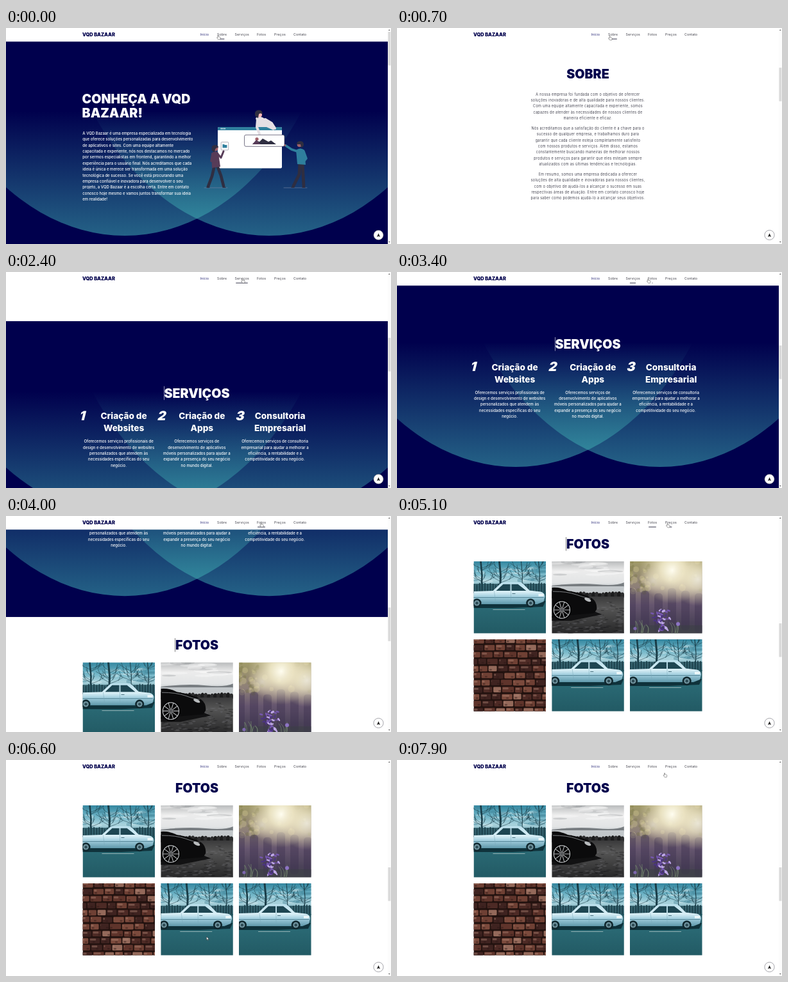
An HTML page for the animation above (8 s loop, 600x338 px).

```html
<!DOCTYPE html>
<html lang="pt-BR">
<head>
<meta charset="utf-8">
<title>VQD Bazaar</title>
<style>
html, body { margin: 0; width: 100%; height: 100%; overflow: hidden; background: #fff; }
svg { display: block; }
text { font-family: Inter, "Open Sans", sans-serif; white-space: pre; }
.black { font-weight: 900; }
.h { font-size: 19.6px; font-weight: 900; }
.mid { text-anchor: middle; }
.body { font-size: 6px; font-weight: 500; fill: #fff; }
.about { font-size: 5.5px; font-weight: 300; letter-spacing: .32px; fill: #0c0c1c; }
.nav { font-size: 5.2px; font-weight: 400; letter-spacing: .12px; fill: #3c3c46; }
</style>
</head>
<body>
<svg id="stage" width="600" height="338" viewBox="0 0 600 338">
  <defs>
    <linearGradient id="glow" gradientUnits="userSpaceOnUse" x1="0" y1="110" x2="0" y2="305">
      <stop offset="0" stop-color="#48c4c0" stop-opacity="0"/>
      <stop offset="1" stop-color="#48c4c0" stop-opacity=".5"/>
    </linearGradient>
    <linearGradient id="sky" x2="0" y2="1">
      <stop offset="0" stop-color="#3487a0"/><stop offset=".35" stop-color="#6fb4c6"/>
      <stop offset=".6" stop-color="#a9d3dd"/><stop offset="1" stop-color="#4f8794"/>
    </linearGradient>
    <linearGradient id="road" x2="0" y2="1">
      <stop offset="0" stop-color="#1f515c"/><stop offset=".35" stop-color="#2a6974"/><stop offset="1" stop-color="#225a64"/>
    </linearGradient>
    <linearGradient id="paint" x2="0" y2="1">
      <stop offset="0" stop-color="#b9dfec"/><stop offset=".45" stop-color="#d9eff6"/>
      <stop offset=".65" stop-color="#a3cfdf"/><stop offset="1" stop-color="#5f98aa"/>
    </linearGradient>
    <linearGradient id="cloud" x2="0" y2="1">
      <stop offset="0" stop-color="#b9bbbc"/><stop offset=".35" stop-color="#ececec"/>
      <stop offset=".8" stop-color="#e2e4e5"/><stop offset="1" stop-color="#b9bfc2"/>
    </linearGradient>
    <linearGradient id="asphalt" x2="0" y2="1">
      <stop offset="0" stop-color="#3a3a3b"/><stop offset=".3" stop-color="#555"/><stop offset="1" stop-color="#262627"/>
    </linearGradient>
    <linearGradient id="dusk" x2="0" y2="1">
      <stop offset="0" stop-color="#a09a68"/><stop offset=".35" stop-color="#8e8078"/>
      <stop offset=".6" stop-color="#66566f"/><stop offset=".85" stop-color="#4b4258"/><stop offset="1" stop-color="#45454c"/>
    </linearGradient>
    <radialGradient id="sun">
      <stop offset="0" stop-color="#fffdf0"/><stop offset=".35" stop-color="#f6efcf" stop-opacity=".85"/>
      <stop offset="1" stop-color="#e6d8b8" stop-opacity="0"/>
    </radialGradient>
  </defs>
  <rect width="600" height="338" fill="#fff"/>
  <g id="page"></g>
  <g id="head"></g>
  <g id="chrome">
    <circle cx="580.5" cy="324" r="7.6" fill="#fff" stroke="#6a6a74" stroke-width=".6"/>
    <path d="M580.5 321.2L583 327L580.5 325.8L578 327Z" fill="#111"/>
    <rect x="595" width="5" height="338" fill="#fcfcfc"/>
    <path d="M596 4L597.3 2.2L598.6 4ZM596 334L597.3 335.8L598.6 334Z" fill="#555"/>
    <rect id="thumb" x="595.4" y="6" width="4" height="52.5" fill="#dadada"/>
  </g>
  <g id="pointer">
    <path id="arrow" d="M0 0V5.2L1.3 4.1L2.1 5.9L2.9 5.5L2.1 3.8H3.8Z" fill="#fff" stroke="#222" stroke-width=".5"/>
    <path id="hand" d="M-.5 .6Q0 -.3 .6 .6V2.7L3.1 3.2Q3.9 3.5 3.8 4.4L3.2 7H.2L-1.9 4.2Q-1.8 3.3 -1 3.7L-.5 4.1Z" fill="#fff" stroke="#333" stroke-width=".45"/>
  </g>
</svg>
<script>
const $ = id => document.getElementById(id);
const NAVY = '#00004d', LOOP = 8000, LINE = 9.37;

const rect = (x, y, w, h, fill, more = '') =>
  `<rect x="${x}" y="${y}" width="${w}" height="${h}" fill="${fill}" ${more}/>`;
const dot = (x, y, r, fill, more = '') => `<circle cx="${x}" cy="${y}" r="${r}" fill="${fill}" ${more}/>`;
const oval = (x, y, rx, ry, fill, more = '') =>
  `<ellipse cx="${x}" cy="${y}" rx="${rx}" ry="${ry}" fill="${fill}" ${more}/>`;
const shape = (d, fill) => `<path d="${d}" fill="${fill}"/>`;
const stroke = (d, color, w) =>
  `<path d="${d}" fill="none" stroke="${color}" stroke-width="${w}" stroke-linecap="round" stroke-linejoin="round"/>`;
const text = (x, y, cls, s, more = '') => `<text x="${x}" y="${y}" class="${cls}" ${more}>${s}</text>`;
const lines = (x, y, cls, s) =>
  s.split('|').map((row, i) => text(x, y + i * LINE, cls, row)).join('');
const box = (x, y, w, h, inner) => `<svg x="${x}" y="${y}" width="${w}" height="${h}">${inner}</svg>`;
const repeat = (n, draw) => Array.from({ length: n }, (_, i) => draw(i)).join('');

function seeded(seed) {
  return () => (seed = (seed * 16807) % 2147483647) / 2147483647;
}

function blueSection(top) {
  const arc = cx => oval(cx, -175, 343, 480, 'url(#glow)');
  return box(0, top, 595, 338, rect(0, 0, 595, 338, NAVY) + arc(185) + arc(410));
}

function illustration() {
  const dark = '#2f2e41', skin = '#a0616a', pale = '#e4dfe4', teal = '#2f7f9d', plum = '#573c58';
  const ground = x => stroke(`M${x} 250H${x + 36}`, '#6f7f9f', .7);
  return rect(330, 155, 100, 64.5, '#fff', 'rx="2"')
    + shape('M330 160V157Q330 155 332 155H428Q430 155 430 157V160Z', teal)
    + [335.5, 338.2, 340.9].map(x => dot(x, 157.5, .9, '#fff')).join('')
    // seated figure
    + shape('M389 141Q393 137 400 140L412 147L420 155L417 160L406 155H393Z', pale)
    + stroke('M392 143L391 155L395 166', pale, 4)
    + stroke('M404 143L414 149L419 157', pale, 4)
    + dot(395, 135.5, 4, '#ffb8b8')
    + shape('M388 133Q389 128 395 128.5Q400 129 399.5 135Q396 132 394 135L393 141Q387 139 388 133Z', dark)
    // floating card
    + rect(371.5, 167.3, 62.5, 18, '#fff', 'rx="2.5" stroke="#3f3d56" stroke-width=".7"')
    + dot(391, 173.8, 2.6, skin)
    + shape('M384 182L390 176L395 178L400 173L409 178L413 176L421 182Z', dark)
    + shape('M384 182L390 175L397 182Z', plum)
    // left figure
    + ground(309)
    + stroke('M325 215L321 232L315 248', dark, 4.6) + stroke('M329 215L335 231L339 247', dark, 4.6)
    + stroke('M313 249.3H317M338 249.3H342', dark, 1.4)
    + shape('M320 196Q326 191 331 195L334 217L321 219Z', plum)
    + stroke('M322 197L320 208L327 209', plum, 3.6) + stroke('M330 197L335 203L339 193', plum, 3)
    + dot(326.5, 188.5, 4, skin)
    + shape('M320.5 189Q320 183 326 183Q331 183 331 187Q327 187 326 190L325 194Q321 194 320.5 189Z', dark)
    + rect(335.2, 178.5, 11.5, 12.5, '#fff', 'rx="1.2" stroke="#3f3d56" stroke-width=".4"')
    + shape('M337.5 182H340L341 183H344.4V187.6H337.5Z', teal)
    // right figure
    + ground(433)
    + stroke('M458 211L457 229L448 247', dark, 4.8) + stroke('M462 211L463 230L464 247', dark, 4.8)
    + stroke('M445 249.3H449M462 249.3H466', dark, 1.4)
    + shape('M452 191Q459 186 465 191L467 214L454 213Z', teal)
    + stroke('M454 193L445 190L436 184', teal, 3.6) + stroke('M464 193L468 204L462 211', teal, 3.6)
    + dot(434.8, 183.4, 1.5, skin) + dot(457.5, 182.5, 3.8, skin)
    + shape('M453 182Q453 177 459 177Q464 177 464 183Q463 187 460 187L459 182Z', dark);
}

function whiteCar() {
  const r = seeded(7), ink = '#1a3d48';
  const clouds = repeat(34, i =>
    oval(r() * 113, 4 + r() * 28, 4 + r() * 9, 1 + r() * 1.8, i % 2 ? '#d6ebf0' : '#3f8296', 'opacity=".45"'));
  const tree = (x, w) => stroke(`M${x} 48L${x + 1} 22L${x - 1} 0`, ink, w) + repeat(10, i => {
    const y = 8 + r() * 26, d = (i % 2 ? 1 : -1) * (6 + r() * 16);
    return stroke(`M${x} ${y}Q${x + d / 2} ${y - 3} ${x + d} ${y - 10}m${-d / 3} 5l${d / 5} -9`, ink, .55);
  });
  const wheel = x => dot(x, 65.2, 7, '#10272e') + dot(x, 65.2, 4.4, '#6f929d') + dot(x, 65.2, 2.2, '#2c4a54');
  return rect(0, 0, 113, 50, 'url(#sky)') + clouds
    + tree(12, 2.6) + tree(41, 3) + tree(75, 1) + tree(102, 1.2)
    + rect(0, 35, 113, 14, '#2a5561', 'opacity=".85"')
    + repeat(28, i => rect(i * 4.2, 33 + r() * 4, 1.6, 14, ink))
    + rect(0, 48, 113, 65, 'url(#road)') + shape('M0 62H112L108 71L60 73H0Z', '#0f323b')
    + shape('M0 47L30 46L42 34.5Q45 32.3 51 32.3H69Q74 32.3 78 36L87 45.5L104 47.5Q111 49 111 55L109 63L99 67H0Z', 'url(#paint)')
    + shape('M35 46L46 35.7H57V46ZM59 46V35.7H69L82 46Z', '#1e4652')
    + stroke('M0 56.5H109', '#4d7f90', .9) + stroke('M58 36V63M32 47L34 62', '#7ba9b8', .5)
    + rect(60, 50, 5, .8, '#2c5664') + rect(101, 51, 8, 3.6, '#eef8fa')
    + wheel(5) + wheel(88.7) + rect(30, 75, 50, .9, '#9dbabb');
}

function blackCar() {
  const r = seeded(23), cx = 15.7, cy = 76;
  const clouds = repeat(20, i =>
    oval(r() * 113, r() * 26, 8 + r() * 14, 1 + r() * 2.5, i % 3 ? '#fafafa' : '#9da0a2', 'opacity=".4"'));
  const wall = repeat(24, i => oval(i * 5, 52 + r() * 2, 3.2, 4 + r() * 2, i % 2 ? '#1c1c1d' : '#2d2d2e'));
  const cobbles = repeat(150, i =>
    oval(r() * 113, 64 + r() * 49, 2 + r() * 3, .8, i % 2 ? '#77777a' : '#161617', 'opacity=".4"'));
  const spokes = repeat(10, i => {
    const a = i * Math.PI / 5;
    return stroke(`M${cx} ${cy}L${cx + 12 * Math.cos(a)} ${cy + 12.5 * Math.sin(a)}`, '#b5b7b9', 1.1);
  });
  return rect(0, 0, 113, 42, 'url(#cloud)') + clouds
    + shape('M0 38Q40 33 70 36T113 33V40H0Z', '#777c80') + rect(0, 39, 113, 12, '#c2c7ca')
    + wall + rect(0, 55, 113, 58, 'url(#asphalt)') + cobbles
    + shape('M0 86L66 78L78 83L30 93H0Z', '#121213')
    + shape('M0 41Q14 40 25 46Q50 50 63 58Q71 64 70 75L66 81L32 84L0 88Z', '#0b0b0c')
    + stroke('M2 47Q24 47 38 52T60 58', '#8a8d90', .9)
    + oval(56, 60, 5.5, 2.4, '#b9bcbe', 'transform="rotate(24 56 60)"')
    + oval(cx, cy, 15, 16, '#050506')
    + oval(cx, cy, 12.6, 13.2, 'none', 'stroke="#b9bcbe" stroke-width="1.2"')
    + spokes + dot(cx, cy, 2.4, '#55575a');
}

function flowers() {
  const r = seeded(41);
  const leaves = repeat(46, i =>
    dot(r() * (i % 3 ? 30 : 112), r() * 50, 1.5 + r() * 4, i % 2 ? '#6f7038' : '#e0d69a', 'opacity=".28"'));
  const fence = repeat(6, i =>
    rect(-4 + i * 21, 42 + (i % 3) * 4, 13, 62, '#3d3050', 'rx="5" opacity=".42"'));
  const stems = repeat(14, () => {
    const x = 6 + r() * 70;
    return stroke(`M${x} 113Q${x + 3} 102 ${x + 5 - r() * 10} ${92 + r() * 10}`, '#70806c', .8);
  });
  const petals = repeat(44, i => {
    const x = 32 + (r() + r()) * 16, y = 76 + r() * 32;
    return oval(x, y, 2.9, 1.3, ['#7657b0', '#bfa9e6', '#4b3480'][i % 3], `transform="rotate(${r() * 180} ${x} ${y})"`);
  });
  return rect(0, 0, 113, 113, 'url(#dusk)') + leaves + fence
    + dot(66, 14, 52, 'url(#sun)') + dot(106, 28, 42, 'url(#sun)', 'opacity=".75"') + dot(36, 30, 22, 'url(#sun)', 'opacity=".4"')
    + rect(0, 100, 113, 13, '#3b3e44', 'opacity=".5"') + stems + petals
    + dot(75, 98, 3, '#8d74c4') + dot(8, 105, 2.6, '#7c66ad');
}

function bricks() {
  const r = seeded(5), tones = ['#5f342b', '#6f4034', '#4d2a25', '#7b4a3c', '#3f2320', '#94695a'];
  let s = rect(0, 0, 113, 113, '#22120f');
  for (let row = 0; row < 11; row++)
    for (let x = -r() * 14; x < 113;) {
      const w = 11 + r() * 8, y = row * 11 - 3 + r();
      s += rect(x, y, w, 8.6, tones[Math.floor(r() * 6)], 'rx="1.4"')
        + rect(x + 1, y + 1, w * .7 * r(), 3, '#b58b79', 'opacity=".4" rx="1"')
        + rect(x + w * r() * .7, y + 5, 4, 2.4, '#2a1714', 'opacity=".45" rx="1"');
      x += w + 1.8;
    }
  return s;
}

const photos = [whiteCar, blackCar, flowers, bricks, whiteCar, whiteCar].map((draw, i) =>
  box(119.5 + (i % 3) * 121.75, 1105 + Math.floor(i / 3) * 122, 112.5, 112.5, draw())).join('');

const services = [
  ['Criação de', 'Websites', 'Oferecemos serviços profissionais de|design e desenvolvimento de websites|personalizados que atendem às|necessidades específicas do seu|negócio.'],
  ['Criação de', 'Apps', 'Oferecemos serviços de|desenvolvimento de aplicativos|móveis personalizados para ajudar a|expandir a presença do seu negócio|no mundo digital.'],
  ['Consultoria', 'Empresarial', 'Oferecemos serviços de consultoria|empresarial para ajudar a melhorar a|eficiência, a rentabilidade e a|competitividade do seu negócio.']
].map(([a, b, copy], i) => {
  const x = 175.6 + i * 121.75, title = 'font-size="13.6" font-weight="800" fill="#fff"';
  return `<g transform="translate(${x - 62} 851) skewX(-14)">${text(0, 0, 'black', i + 1, 'font-size="20" fill="#fff"')}</g>`
    + text(x + 8, 849.6, 'mid', a, title) + text(x + 8, 868.6, 'mid', b, title)
    + lines(x, 886.6, 'body mid', copy);
}).join('');

$('page').innerHTML = blueSection(20)
  + text(118.6, 117.8, 'h', 'CONHEÇA A VQD', 'fill="#fff"') + text(118.6, 140.2, 'h', 'BAZAAR!', 'fill="#fff"')
  + lines(119.3, 167, 'body', 'A VQD Bazaar é uma empresa especializada em tecnologia|que oferece soluções personalizadas para desenvolvimento|de aplicativos e sites. Com uma equipe altamente|capacitada e experiente, nós nos destacamos no mercado|por sermos especialistas em frontend, garantindo a melhor|experiência para o usuário final. Nós acreditamos que cada|ideia é única e merece ser transformada em uma solução|tecnológica de sucesso. Se você está procurando uma|empresa confiável e inovadora para desenvolver o seu|projeto, a VQD Bazaar é a escolha certa. Entre em contato|conosco hoje mesmo e vamos juntos transformar sua ideia|em realidade!')
  + illustration()
  + text(297.5, 437, 'h mid', 'SOBRE', `fill="${NAVY}"`)
  + lines(297.5, 463.7, 'about mid', 'A nossa empresa foi fundada com o objetivo de oferecer|soluções inovadoras e de alta qualidade para nossos clientes.|Com uma equipe altamente capacitada e experiente, somos|capazes de atender às necessidades de nossos clientes de|maneira eficiente e eficaz.')
  + lines(297.5, 516.8, 'about mid', 'Nós acreditamos que a satisfação do cliente é a chave para o|sucesso de qualquer empresa, e trabalhamos duro para|garantir que cada cliente esteja completamente satisfeito|com nossos produtos e serviços. Além disso, estamos|constantemente buscando maneiras de melhorar nossos|produtos e serviços para garantir que eles estejam sempre|atualizados com as últimas tendências e tecnologias.')
  + lines(297.5, 588.9, 'about mid', 'Em resumo, somos uma empresa dedicada a oferecer|soluções de alta qualidade e inovadoras para nossos clientes,|com o objetivo de ajudá-los a alcançar o sucesso em suas|respectivas áreas de atuação. Entre em contato conosco hoje|para saber como podemos ajudá-lo a alcançar seus objetivos.')
  + blueSection(696)
  + text(297.5, 816, 'h mid', 'SERVIÇOS', 'fill="#fff"') + services
  + text(297.5, 1085, 'h mid', 'FOTOS', `fill="${NAVY}"`) + photos
  + '<rect id="caret" width=".7" height="21.5"/>';

// label, x, width, hover start, hover end
const links = [
  ['Início', 302.5, 13.5], ['Sobre', 329, 15, -170, 1450], ['Serviços', 356.5, 22, 1600, 3250],
  ['Fotos', 391, 14, 3350, 5080], ['Preços', 418, 17.5, 5010, 5400], ['Contato', 448, 21]
];
$('head').innerHTML = rect(0, 0, 595, 21.3, '#fff')
  + text(119, 13, 'black', 'VQD BAZAAR', `font-size="7.4" fill="${NAVY}"`)
  + links.map(([s, x], i) => text(x, 12.2, 'nav', s, i ? '' : 'style="fill:#2a2a78"')).join('')
  + links.map((_, i) => `<rect id="bar${i}" y="16.7" height=".9" fill="#22223a"/>`).join('');

const clamp = v => Math.max(0, Math.min(1, v));
const ease = v => { v = clamp(v); return v * v * (3 - 2 * v); };

const SCROLLS = [[0, 358], [1917, 338], [3636, 338]];
const BLINKS = [[1100, 1600], [2100, 2650], [3100, 4100], [4600, 5150], [5650, 6150]];
const CARETS = [[262.6, 418, '#222'], [246.3, 798, '#fff'], [263, 1067, '#222']];
const PATH = [
  [0, 330.5, 11], [700, 331.5, 12], [1250, 331.5, 12], [1800, 368.5, 10.3], [3050, 368.5, 10.3],
  [3550, 397.5, 10.3], [4550, 397.5, 10.3], [5100, 421.5, 11], [5500, 424, 14], [6500, 312.5, 276.5],
  [6900, 312.5, 276.5], [7800, 417, 20], [8000, 417, 20]
];

function pointerAt(t) {
  const i = PATH.findIndex(p => p[0] > t), a = PATH[i - 1], b = PATH[i];
  const k = ease((t - a[0]) / (b[0] - a[0]));
  return [a[1] + (b[1] - a[1]) * k, a[2] + (b[2] - a[2]) * k];
}

function render(t) {
  const scroll = SCROLLS.reduce((y, [start, by]) => y + by * ease((t - start) / 700), 0);
  $('page').setAttribute('transform', `translate(0 ${-scroll})`);
  $('thumb').setAttribute('y', 6 + scroll * .1567);

  const [cx, cy, color] = CARETS[t < 1917 ? 0 : t < 3636 ? 1 : 2], caret = $('caret');
  caret.setAttribute('x', cx);
  caret.setAttribute('y', cy);
  caret.setAttribute('fill', color);
  caret.setAttribute('opacity', BLINKS.some(([a, b]) => t >= a && t < b) ? .8 : 0);

  links.forEach(([, x, w, from = 1e9, to = 1e9], i) => {
    const grow = .84 * w * (ease((t - from) / 300) - ease((t - to) / 300));
    $('bar' + i).setAttribute('x', x + (w - grow) / 2);
    $('bar' + i).setAttribute('width', Math.max(0, grow));
  });

  const [px, py] = pointerAt(t), onLink = py < 21;
  $('pointer').setAttribute('transform', `translate(${px} ${py})`);
  $('hand').setAttribute('opacity', onLink ? 1 : 0);
  $('arrow').setAttribute('opacity', onLink ? 0 : 1);
}

const begin = performance.now();
function tick() {
  render((performance.now() - begin) % LOOP);
  requestAnimationFrame(tick);
}
tick();
</script>
</body>
</html>
```
